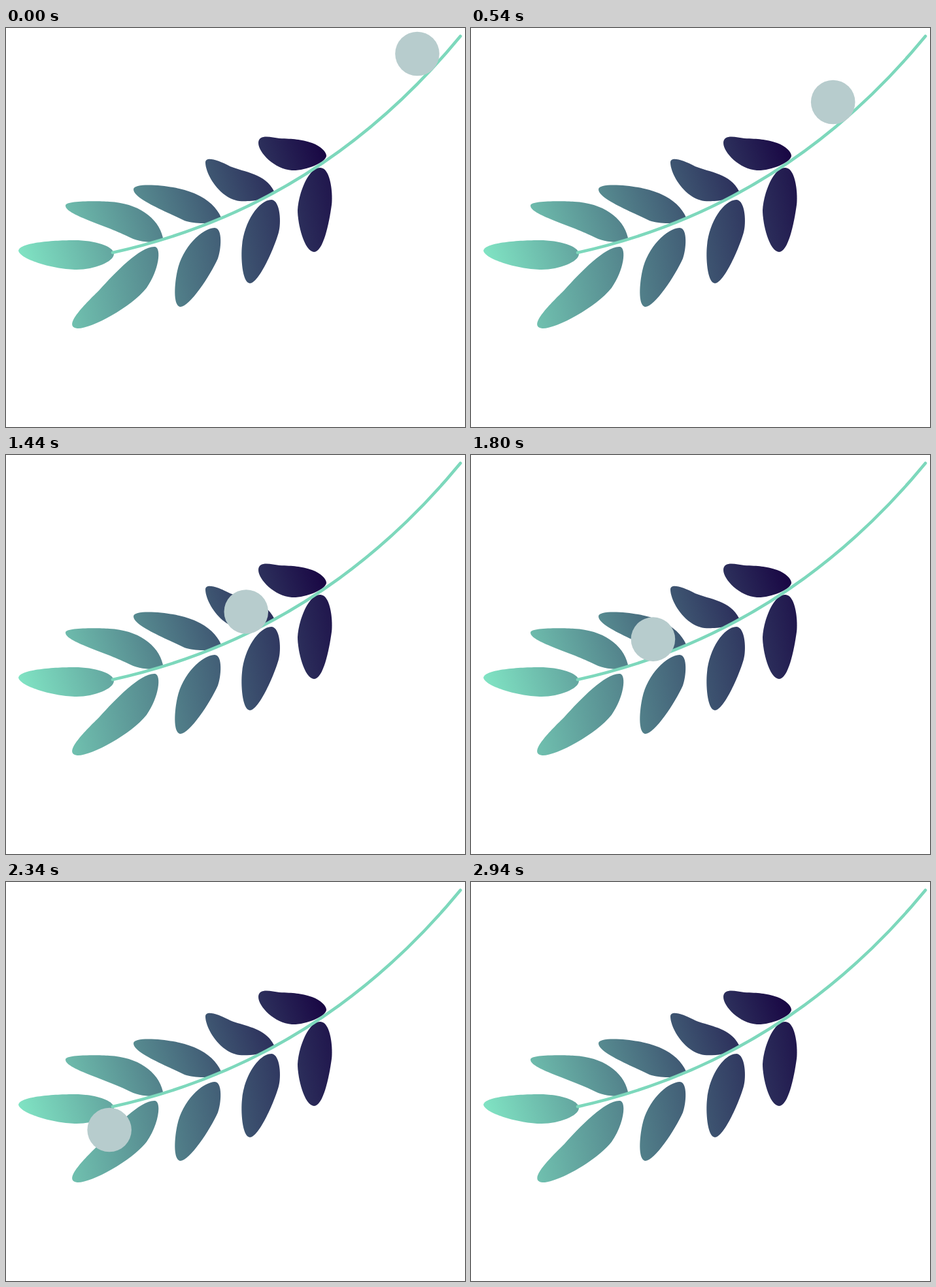
An HTML page that plays this animation: 702x611 px, repeating every 3000 ms.

```html
<!DOCTYPE html>
<html lang="en">
<head>
<meta charset="utf-8">
<title>Branch and ball</title>
<style>
  html, body { margin: 0; width: 100%; height: 100%; overflow: hidden; background: #fff; }
  svg { display: block; }
</style>
</head>
<body>
<svg width="702" height="611" viewBox="0 0 702 611">
  <defs>
    <linearGradient id="upper" gradientUnits="userSpaceOnUse" x1="20" y1="341" x2="500" y2="184">
      <stop offset="0" stop-color="#80e3c3"/>
      <stop offset="1" stop-color="#160040"/>
    </linearGradient>
    <linearGradient id="lower" href="#upper" gradientUnits="userSpaceOnUse" x1="7" y1="425" x2="570" y2="324"/>
  </defs>
  <g fill="url(#upper)">
    <path d="M19 341C21 328 75 325 105 325C135 325 165 334 165 346C165 358 135 370 108 370C75 370 22 355 19 341Z"/>
    <path d="M91 272C91 264 140 265 158 266C201 268 233 290 240 321C239 331 206 330 186 319C150 301 91 286 91 272Z"/>
    <path d="M195 247C195 236 246 241 265 246C300 254 320 270 329 290C325 301 292 301 273 295C240 279 195 261 195 247Z"/>
    <path d="M305 207C304 196 322 201 343 212C365 221 397 223 410 250C403 264 372 266 357 265C327 261 306 225 305 207Z"/>
    <path d="M386 176C386 162 405 167 418 169C440 170 450 170 468 176C482 181 490 190 490 196C488 207 457 219 437 218C411 216 386 191 386 176Z"/>
  </g>
  <g fill="url(#lower)">
    <path d="M228 335C238 337 234 371 215 398C191 428 130 461 109 460C85 457 123 421 143 401C168 373 207 333 228 335Z"/>
    <path d="M319 306C332 306 329 340 324 353C312 380 280 428 266 427C255 424 258 390 262 372C270 335 300 307 319 306Z"/>
    <path d="M406 263C420 264 421 300 417 313C409 341 386 391 373 391C361 390 359 350 361 333C364 297 387 263 406 263Z"/>
    <path d="M481 214C497 215 500 255 498 271C494 300 485 343 471 343C456 342 446 300 446 279C447 255 462 213 481 214Z"/>
  </g>
  <path d="M163 344Q480 274 695 12.5" fill="none" stroke="#7dd8bc" stroke-width="4.6" stroke-linecap="round"/>
  <circle id="ball" r="33.8" fill="#b7cccd"/>
</svg>
<script>
  const LOOP = 3000, STEP = 60;
  const ball = document.getElementById('ball');
  // Waypoints of the roll: time, x, y
  const keys = [
    [0, 629, 39.5], [540, 553.7, 113.5], [960, 477, 173], [1440, 367.3, 240],
    [2100, 207, 325], [2580, 114.5, 445.5], [2700, 100, 490], [2760, 92, 525]
  ];
  const end = keys[keys.length - 1][0];

  function slope(i, axis) {
    const a = keys[Math.max(i - 1, 0)], b = keys[Math.min(i + 1, keys.length - 1)];
    return (b[axis] - a[axis]) / (b[0] - a[0]);
  }

  // Cubic Hermite curve through the waypoints
  function position(t, axis) {
    let i = 0;
    while (i < keys.length - 2 && t >= keys[i + 1][0]) i++;
    const a = keys[i], b = keys[i + 1], span = b[0] - a[0];
    const u = (t - a[0]) / span, v = 1 - u;
    return a[axis] * v * v * (1 + 2 * u) + b[axis] * u * u * (3 - 2 * u)
      + span * u * v * (slope(i, axis) * v - slope(i + 1, axis) * u);
  }

  function draw(t) {
    const visible = t <= end;
    ball.setAttribute('visibility', visible ? 'visible' : 'hidden');
    if (!visible) return;
    ball.setAttribute('cx', position(t, 1));
    ball.setAttribute('cy', position(t, 2));
  }

  const start = performance.now();
  function tick() {
    const t = (performance.now() - start) % LOOP;
    draw(Math.floor(t / STEP) * STEP);
    requestAnimationFrame(tick);
  }
  tick();
</script>
</body>
</html>
```
